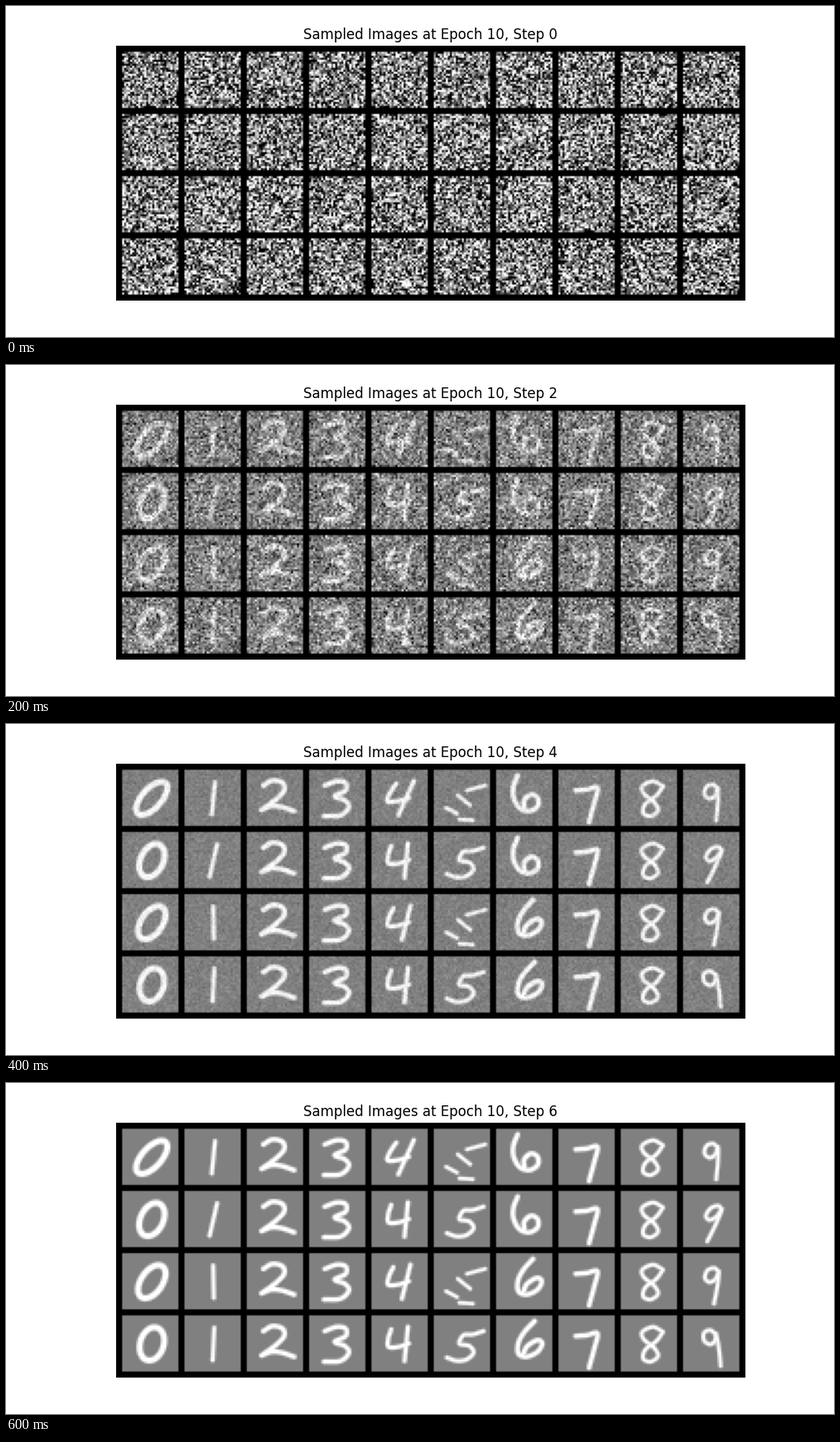
Write a matplotlib script that moves like this. It is 1000x400 px and loops after 0.7 s.

```python
import numpy as np
import matplotlib.pyplot as plt
from matplotlib.animation import FuncAnimation

CELL, PAD, ROWS, COLS, STEPS = 28, 3, 4, 10, 7
PITCH = CELL + PAD
UNIT = 308 / (ROWS * PITCH + PAD)   # stage pixels per sample pixel

digits = np.zeros((ROWS, COLS, CELL, CELL))
gy, gx = (np.mgrid[:CELL, :CELL] + 0.5) * UNIT


def spline(pts, n=24):
    """Catmull-Rom curve through the points."""
    p = np.array(pts, float)
    p = np.vstack([2 * p[0] - p[1], p, 2 * p[-1] - p[-2]])
    t = np.linspace(0, 1, n)[:, None]
    return np.vstack([
        b + 0.5 * t * (c - a + t * (2 * a - 5 * b + 4 * c - d
                                    + t * (3 * (b - c) + d - a)))
        for a, b, c, d in zip(p, p[1:], p[2:], p[3:])])


def ellipse(cx, cy, rx, ry, n=24):
    t = np.linspace(0, 2 * np.pi, n)
    return np.column_stack([cx + rx * np.cos(t), cy + ry * np.sin(t)])


def write(digit, width, *strokes, rows=range(ROWS), lean=(0,) * ROWS, pivot=34):
    """Write one digit in each row, sheared sideways about the pivot height."""
    for row, slope in zip(rows, lean):
        for pts in strokes:
            x, y = spline(pts).T
            x = x + slope * (pivot - y)
            dist = np.hypot(gx[..., None] - x, gy[..., None] - y).min(axis=2)
            ink = np.clip(0.5 + (width / 2 - dist) / 2.8, 0, 1)
            digits[row, digit] = np.maximum(digits[row, digit], ink)


# key points in stage pixels from the cell corner
write(0, 7.5, ellipse(36, 34.5, 14.5, 20), lean=(0.6, 0.25, 0.4, 0.15))
write(1, 5.2, [(35, 15), (35, 54)], lean=(0.1, 0.23, -0.02, 0.05))
write(2, 6, [(20, 19), (31, 13), (43, 16), (45, 25), (35, 36), (20, 47),
             (19, 48), (30, 44), (42, 45), (57, 50)])
write(3, 5.8, [(19, 19), (33, 14), (44, 16), (44, 25), (31, 32), (43, 37),
               (48, 45), (38, 55), (18, 56)])
write(4, 5.5, [(23, 17), (20, 28), (21, 38), (33, 38), (45, 34)],
      [(43, 14), (41, 55)], lean=(0.4, 0.05, 0.2, 0.05))
write(5, 5.2, [(60, 19), (47, 23), (36, 24), (31, 34), (43, 37), (48, 45),
               (40, 53), (28, 55), (16, 51)], rows=(1, 3))
write(5, 4.6, [(62, 19), (40, 25)], [(29, 31), (44, 43)],
      [(15, 46), (28, 53)], [(31, 60), (47, 61)], rows=(0, 2))
write(6, 6, [(26, 7), (21, 20), (21, 33), (28, 46), (40, 50), (50, 44),
             (50, 34), (42, 30), (34, 37), (34, 46)],
      lean=(0, 0, 0.5, 0.55), pivot=44)
write(7, 5.9, [(21, 25), (34, 24), (47, 22), (43, 41), (37, 63)])
write(8, 4.9, [(51, 20), (39, 14), (26, 20), (28, 29), (40, 39), (45, 49),
               (36, 56), (27, 52), (30, 41), (43, 31), (51, 20)])
write(9, 4.9, [(42, 23), (36, 18), (28, 21), (26, 30), (32, 35), (39, 31),
               (42, 22), (42, 40), (40, 61)], lean=(0, 0.4, 0.1, -0.2))

noise = np.random.default_rng(10).standard_normal(digits.shape)


def sheet(step):
    """All samples at one step, laid out on a black grid."""
    left = (1 - step / (STEPS - 1)) ** 2.4      # share of noise remaining
    blend = (1 - left) * digits + 0.9 * left * noise
    cells = np.pad(np.clip(0.5 + 0.5 * blend, 0, 1),
                   [(0, 0), (0, 0), (PAD, 0), (PAD, 0)])
    grid = cells.transpose(0, 2, 1, 3).reshape(ROWS * PITCH, COLS * PITCH)
    return np.pad(grid, [(0, PAD), (0, PAD)])


plt.rcParams["font.family"] = "DejaVu Sans"
fig, ax = plt.subplots(figsize=(10, 4), dpi=100)
ax.axis("off")
img = ax.imshow(sheet(0), cmap="gray", vmin=0, vmax=1)
title = ax.set_title("", fontsize=12)


def update(step):
    img.set_data(sheet(step))
    title.set_text(f"Sampled Images at Epoch 10, Step {step}")
    return img, title


anim = FuncAnimation(fig, update, frames=STEPS, interval=100,
                     repeat=True, repeat_delay=0, blit=False)
plt.show()
```
